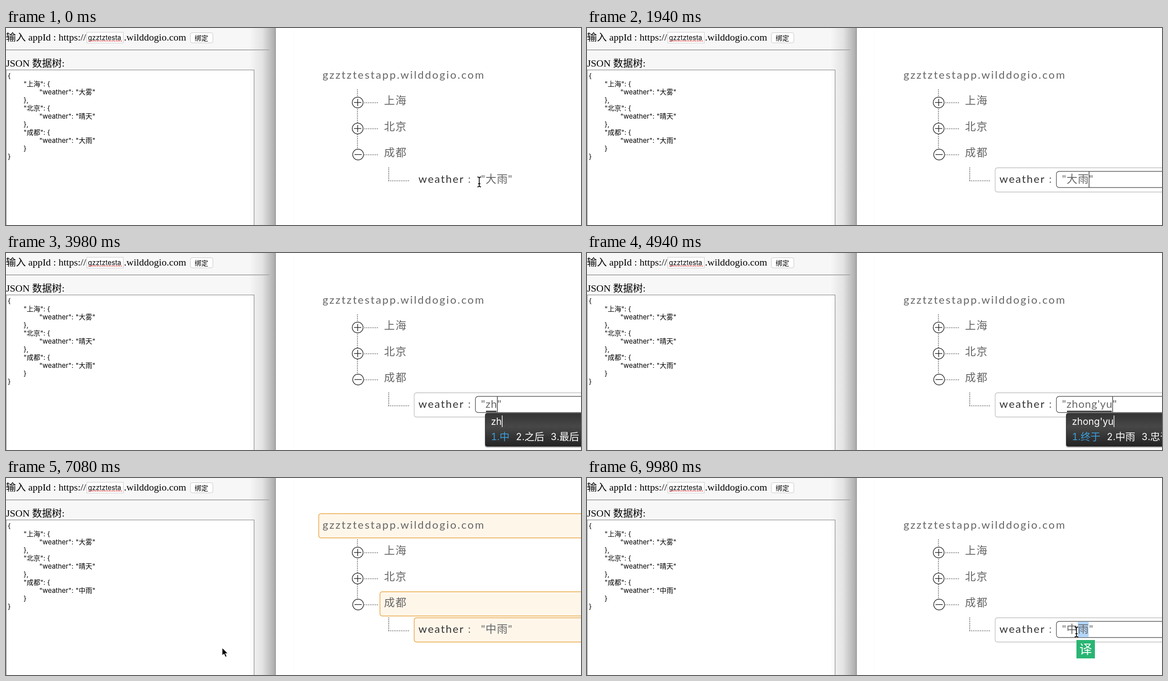
Write an HTML page that moves like this. It is 1277x439 px and loops after 10 s.

```html
<!DOCTYPE html>
<html lang="zh">
<head>
<meta charset="utf-8">
<title>JSON 数据树</title>
<style>
  html, body { margin: 0; width: 100%; height: 100%; overflow: hidden; background: #fff; }
  svg { display: block; }
  .serif { font: 22px "Liberation Serif", "Noto Sans CJK SC", serif; }
  .ui { font: 15px Inter, "Noto Sans CJK SC", sans-serif; }
  .tree { font: 24px Lato, "Noto Sans CJK SC", sans-serif; letter-spacing: 1px; fill: #666; }
  .ime { font: 21px Inter, "Noto Sans CJK SC", sans-serif; font-variant-numeric: tabular-nums; fill: #fff; }
  .dots { fill: none; stroke: #555; stroke-width: 1.7; stroke-dasharray: 2 2; }
  .knob { fill: #fff; stroke: #2a2a2a; stroke-width: 1.5; }
  #flash rect { fill: #fff6ea; stroke: #e5a23c; stroke-width: 1.4; }
</style>
</head>
<body>
<svg width="1277" height="439" viewBox="0 0 1277 439">
  <defs>
    <linearGradient id="edge">
      <stop offset="0" stop-opacity="0"/>
      <stop offset=".5" stop-opacity=".08"/>
      <stop offset="1" stop-opacity=".31"/>
    </linearGradient>
    <linearGradient id="dark" x2="0" y2="1">
      <stop offset="0" stop-color="#343434"/>
      <stop offset=".4" stop-color="#474747"/>
      <stop offset="1" stop-color="#242424"/>
    </linearGradient>
  </defs>

  <rect width="598" height="439" fill="#f7f7f7"/>
  <g class="serif">
    <text x="0" y="28">输入 appId : https://</text>
    <text x="262" y="28">.wilddogio.com</text>
    <text x="0" y="86">JSON 数据树:</text>
  </g>
  <rect x="179.5" y="9.5" width="81" height="24" fill="#fff" stroke="#c8c8c8"/>
  <rect x="409.5" y="10.5" width="50" height="22.5" rx="4" fill="#fff" stroke="#c4c4c4"/>
  <rect x=".5" y="93.5" width="550.5" height="360" fill="#fff" stroke="#777"/>
  <g class="ui">
    <text x="182" y="27">gzztztesta</text>
    <text x="419" y="27.5">绑定</text>
    <g id="json"></g>
  </g>
  <path d="M183 29H259" stroke="#e33" stroke-width="2" stroke-dasharray="2 1.8"/>
  <rect x="540" width="58" height="439" fill="url(#edge)"/>
  <path d="M0 48.5H585" stroke="#929292"/>
  <path d="M0 49.5H585" stroke="#c4c4c4"/>
  <path d="M598.5 0V439" stroke="#777"/>
  <path d="M638.5 0V439" stroke="#fafafa"/>

  <g id="flash">
    <rect x="694.5" y="79.5" width="620" height="54" rx="5"/>
    <rect x="830.5" y="253.5" width="620" height="54" rx="5"/>
    <rect x="906.5" y="311.5" width="620" height="54" rx="5"/>
  </g>
  <rect id="row" x="906.5" y="311.5" width="620" height="54" rx="5" fill="#fff" stroke="#bdbdbd" stroke-width="1.3"/>
  <rect id="edit" x="1042.5" y="319.5" width="500" height="36" rx="6" fill="#fff" stroke="#555" stroke-width="1.4"/>
  <rect id="selection" y="320" height="35" fill="#b3d5f8"/>

  <path class="dots" d="M780.5 137V270M850 311V341M849 340.5H897"/>
  <g id="branches"></g>
  <g class="tree">
    <text x="703" y="113" style="letter-spacing:2.7px">gzztztestapp.wilddogio.com</text>
    <text x="916" y="345" style="letter-spacing:2.2px;fill:#333">weather</text>
    <text x="1026" y="345">:</text>
    <text x="1055" y="345">"</text>
    <text x="1065" y="345" id="value"></text>
    <text y="345" id="quote">"</text>
  </g>
  <path id="caret" stroke="#333" stroke-width="1.4"/>

  <g id="ime">
    <path id="underline" stroke="#333" stroke-width="3"/>
    <rect x="1063" y="358" width="240" height="76" rx="5" opacity=".22"/>
    <rect x="1064.5" y="357" width="240" height="74" rx="4" fill="url(#dark)" stroke="#2a2a2a"/>
    <text class="ime" x="1077" y="382.5" id="typed"></text>
    <path id="typedCaret" stroke="#fff" stroke-width="1.5"/>
    <text class="ime" x="1077" y="417" id="choices"></text>
  </g>

  <g id="badge">
    <rect width="41" height="41" fill="#29b573"/>
    <text x="20.5" y="31" text-anchor="middle" fill="#fff" style="font:28px 'Noto Sans CJK SC',sans-serif">译</text>
  </g>

  <g id="pointer">
    <path id="beam" d="M-4-11Q0-11 0-8Q0-11 4-11M0-8V8M-4 11Q0 11 0 8Q0 11 4 11M-2.5 4H2.5" fill="none" stroke="#111" stroke-width="1.8"/>
    <path id="arrow" d="M0 0V18L4.2 14.2L7.2 21L10.4 19.6L7.4 13H13Z" stroke="#fff" stroke-width="1.2"/>
  </g>
</svg>
<script>
const $ = id => document.getElementById(id);
const LOOP = 10000, VALUE_X = 1065;

// Tree branches: two closed knobs and one open
$('branches').innerHTML = ['上海', '北京', '成都'].map((name, i) => {
  const y = 166 + 58 * i, x = i < 2 ? 781 : 782;
  return `<path class="dots" d="M796 ${y + .5}H828"/>
    <circle class="knob" cx="${x}" cy="${y}" r="12"/>
    <path class="knob" d="M${x - 8} ${y}h16${i < 2 ? `M${x} ${y - 8}v16` : ''}"/>
    <text class="tree" x="839.5" y="${y + 4}" style="letter-spacing:1.5px">${name}</text>`;
}).join('');

// JSON listing
const line = (row, x, text, id = '') => `<text x="${x}" y="${111.5 + 18 * row}" id="${id}">${text}</text>`;
$('json').innerHTML = line(0, 4, '{') + line(10, 4, '}') +
  [['上海', '大雾'], ['北京', '晴天'], ['成都', '大雨']].map(([city, sky], i) =>
    line(3 * i + 1, 39, `"${city}": {`) +
    line(3 * i + 2, 74, '"weather":') +
    line(3 * i + 2, 154.5, `"${sky}"`, `sky${i}`) +
    line(3 * i + 3, 39, i < 2 ? '},' : '}')).join('');

const compose = (text, ...choices) => ({ value: text, ime: choices });
const idle = { value: '大雨', saved: '大雨', row: 0, edit: 0, caret: 0, select: 0, badge: 0, flash: 0, ime: 0 };

// Each step changes part of the state from its time on
const steps = [
  [0, idle],
  [160, { row: 1 }],
  [480, { edit: 1, caret: 1 }],
  [640, { select: 1090, caret: 0 }],
  [780, { select: VALUE_X }],
  [880, { badge: 1076 }],
  [1440, { select: 0, badge: 0, caret: 1 }],
  [2240, { value: '大' }],
  [2440, { value: '' }],
  [2760, compose('z', '在', '这', '中')],
  [3240, { value: '', ime: 0 }],
  [3740, compose('z', '在', '这', '中')],
  [3900, compose('zh', '中', '之后', '最后')],
  [4200, compose('zho', '中', '种', '重')],
  [4340, compose('zhon', '中', '种', '重')],
  [4460, compose('zhong', '中', '种', '重')],
  [4680, compose("zhong'y", '中央', '中雨', '重要')],
  [4840, compose("zhong'yu", '终于', '中雨', '忠于')],
  [5420, { value: '中雨', ime: 0 }],
  [5800, { row: 0, edit: 0, caret: 0, flash: 1, saved: '中雨' }],
  [7640, { flash: 0 }],
  [7860, { row: 1 }],
  [8500, { edit: 1, caret: 1 }],
  [8700, { select: 1090, caret: 0 }],
  [8940, { badge: 1087 }]
];

// Pointer path: time, x, y
const path = [
  [0, 1051, 343], [180, 1051, 343], [460, 1112, 345], [820, 1076, 346], [6250, 1076, 346],
  [6850, 480, 378], [7240, 480, 378], [7500, 640, 396], [7960, 1105, 343],
  [8300, 1105, 343], [8500, 1112, 343], [8860, 1087, 343], [LOOP, 1087, 343]
];

function pointerAt(t) {
  const i = path.findIndex(p => p[0] > t);
  const [t0, x0, y0] = path[i - 1], [t1, x1, y1] = path[i];
  const u = (t - t0) / (t1 - t0), k = u * u * (3 - 2 * u);
  return [x0 + (x1 - x0) * k, y0 + (y1 - y0) * k];
}

const show = (id, on) => { $(id).style.display = on ? '' : 'none'; };
const setText = (id, text) => { if ($(id).textContent !== text) $(id).textContent = text; };
const width = id => $(id).textContent ? $(id).getComputedTextLength() : 0;

function drawIme(s, end) {
  setText('typed', s.value);
  $('typedCaret').setAttribute('d', `M${1078 + width('typed')} 362V388`);
  $('underline').setAttribute('d', `M1066 353H${end - 2}`);
  const html = s.ime.map((word, i) =>
    `<tspan dx="${i ? 14 : 0}" fill="${i ? '#fff' : '#3ba0df'}">${i + 1}.<tspan font-size="22">${word}</tspan></tspan>`).join('');
  if ($('choices').dataset.html !== html) $('choices').innerHTML = $('choices').dataset.html = html;
}

function draw(t) {
  const s = Object.assign({}, ...steps.filter(step => step[0] <= t).map(step => step[1]));
  for (const id of ['row', 'edit', 'caret', 'flash', 'ime', 'badge']) show(id, s[id]);
  setText('value', s.value);
  setText('sky2', `"${s.saved}"`);

  const end = VALUE_X + width('value');
  $('quote').setAttribute('x', end);
  $('caret').setAttribute('d', `M${end} 320V355`);
  show('selection', s.select);
  if (s.select) {
    $('selection').setAttribute('x', s.select);
    $('selection').setAttribute('width', 1114 - s.select);
  }
  if (s.badge) $('badge').setAttribute('transform', `translate(${s.badge} ${s.badge === 1076 ? 364 : 361})`);
  if (s.ime) drawIme(s, end);

  const [x, y] = pointerAt(t), overText = x > 1045 && y > 320 && y < 356;
  $('pointer').setAttribute('transform', `translate(${x} ${y})`);
  show('pointer', t < 1440 || t >= 6250);
  show('beam', overText);
  show('arrow', !overText);
}

function tick() {
  draw(performance.now() % LOOP);
  requestAnimationFrame(tick);
}
tick();
</script>
</body>
</html>
```
